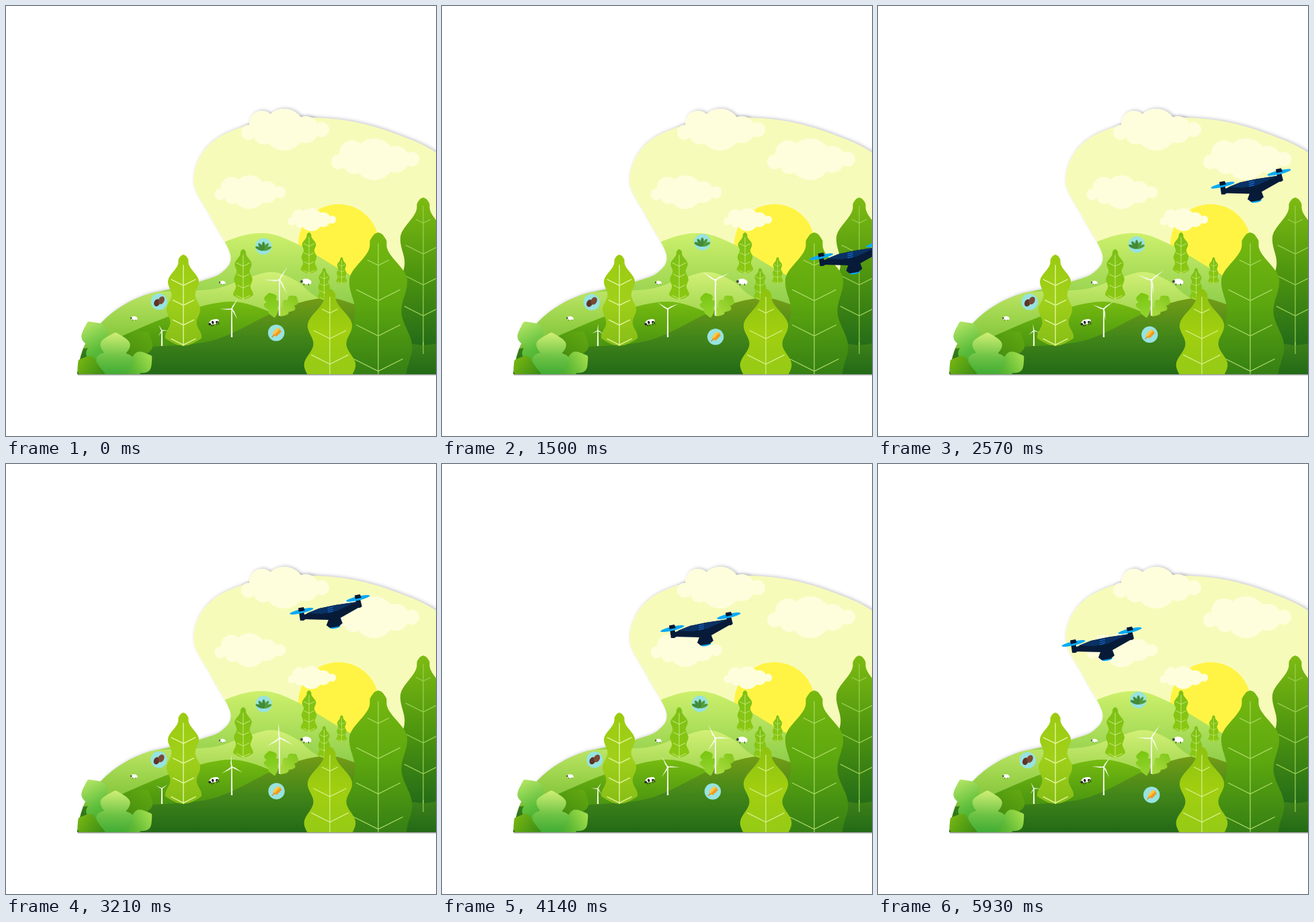
Animation of 640 by 640 pixels, one loop 6000 ms. Source, as an HTML page with a canvas:

```html
<!DOCTYPE html>
<html lang="en">
<head>
<meta charset="utf-8">
<title>Green valley</title>
<style>
html, body { margin: 0; width: 100%; height: 100%; overflow: hidden; background: #fff; }
canvas { display: block; width: 640px; height: 640px; }
</style>
</head>
<body>
<canvas id="stage" width="640" height="640"></canvas>
<script>
const LOOP = 6000, GROUND = 548, TAU = Math.PI * 2;
const stage = document.getElementById('stage').getContext('2d');
const backdrop = document.createElement('canvas');
backdrop.width = backdrop.height = 640;
let c = backdrop.getContext('2d');

const smooth = u => { u = Math.max(0, Math.min(1, u)); return u * u * (3 - 2 * u); };

// Smooth open path through a few points
function spline(pts) {
  const p = new Path2D();
  const at = i => pts[Math.max(0, Math.min(pts.length - 1, i))];
  p.moveTo(...pts[0]);
  for (let i = 0; i < pts.length - 1; i++) {
    const [a, b, d, e] = [at(i - 1), at(i), at(i + 1), at(i + 2)];
    p.bezierCurveTo(b[0] + (d[0] - a[0]) / 6, b[1] + (d[1] - a[1]) / 6,
      d[0] - (e[0] - b[0]) / 6, d[1] - (e[1] - b[1]) / 6, d[0], d[1]);
  }
  return p;
}

function shade(x0, y0, x1, y1, cols) {
  const g = c.createLinearGradient(x0, y0, x1, y1);
  cols.forEach((col, i) => g.addColorStop(i / (cols.length - 1), col));
  return g;
}

function at(x, y, turn, paint) {
  c.save();
  c.translate(x, y);
  c.rotate(turn);
  paint();
  c.restore();
}

function trace(pts) {
  c.beginPath();
  pts.forEach(p => c.lineTo(...p));
}

function poly(pts, style) {
  trace(pts);
  c.fillStyle = style;
  c.fill();
}

function line(pts, style, width) {
  trace(pts);
  c.strokeStyle = style;
  c.lineWidth = width;
  c.stroke();
}

function oval(x, y, rx, ry, style, turn = 0) {
  c.beginPath();
  c.ellipse(x, y, rx, ry, turn, 0, TAU);
  c.fillStyle = style;
  c.fill();
}

// Fills a shape mirrored around its axis, from points of one side
function mirrored(side, style) {
  poly(side.concat(side.map(([x, y]) => [-x, y]).reverse()), style);
}

function hill(pts, top, ...cols) {
  const p = spline(pts);
  p.lineTo(700, GROUND);
  p.lineTo(0, GROUND);
  c.fillStyle = shade(0, top, 0, GROUND, cols);
  c.fill(p);
}

function cloud(x, y, s) {
  const puff = (dx, dy, r) => oval(x + dx * s, y + dy * s, r * s, r * s, '#fefedc');
  puff(-1, 0, 31);
  puff(-34, -9, 19);
  puff(-32, 8, 14);
  puff(31, 0, 20);
  puff(-54, 4, 11);
  puff(55, 0, 11);
}

// Knob on top, first bulge of half width `w` at depth `b`, then waves of length `wave`
function tree(x, top, o) {
  const { tall, w, b, wave, swing, grow, knob, vein, gap, cols, ink, stroke = 1.2, round = false } = o;
  const half = h => {
    const neck = knob * Math.sqrt(Math.min(1, h / knob));
    const bulge = (w - knob) * smooth((h - knob * 1.5) / (b - knob * 1.5));
    const ripple = h > b ? grow * (h - b) + swing * (Math.cos((h - b) / wave * TAU) - 1) : 0;
    const foot = round ? Math.sqrt(Math.min(1, (tall - h) / (w / 2))) : 1;
    return (neck + bulge + ripple) * foot;
  };
  at(x, top, 0, () => {
    const side = [];
    for (let i = 0; i <= 120; i++) side.push([half(tall * i / 120), tall * i / 120]);
    mirrored(side, shade(0, 0, 0, tall, cols));
    line([[0, vein * 0.33], [0, tall]], ink, stroke);
    for (let h = vein; h < tall; h += gap) {
      const reach = half(h - gap * 0.25) * 0.8;
      line([[-reach, h - reach / 2], [0, h], [reach, h - reach / 2]], ink, stroke);
    }
  });
}

function poplar(x, top, s, cols, ink, stroke) {
  tree(x, top, { tall: 136 * s, w: 23 * s, b: 40 * s, wave: 41 * s, swing: 3.2 * s, grow: 0.05,
    knob: 7.5 * s, vein: 46 * s, gap: 29.5 * s, cols, ink, stroke, round: true });
}

// Leaf with three rounded, forward pointing lobes on each side
function lobedLeaf(x0, y0, x1, y1, w, ...cols) {
  const len = Math.hypot(x1 - x0, y1 - y0);
  at(x0, y0, Math.atan2(y1 - y0, x1 - x0) + Math.PI / 2, () => {
    const side = [];
    for (let u = 0; u <= 1.001; u += 0.01) {
      const lobe = Math.abs(Math.sin(u * 3 * Math.PI)) ** 0.8;
      const body = Math.max(0, Math.sin(Math.PI * Math.min(1, u) ** 1.2)) ** 0.6;
      side.push([w * body * (0.58 + 0.42 * lobe), -len * (u + 0.1 * lobe * u * (1 - u) * 2)]);
    }
    mirrored(side, shade(0, -len * 0.2, 0, -len, cols));
  });
}

function sheep(x, y, s) {
  oval(x, y, 6.5 * s, 4.2 * s, '#fff');
  oval(x + 4 * s, y + s, 4 * s, 3.5 * s, '#fff');
  oval(x - 6.5 * s, y, 2 * s, 1.9 * s, '#3d4a38');
  [-3, 4].forEach(d => line([[x + d * s, y + 3 * s], [x + d * s, y + 6 * s]], '#3d4a38', s));
}

function cow(x, y) {
  at(x, y, -0.3, () => {
    [-5, -2, 3, 6].forEach(d => line([[d, 1], [d, 6]], '#2a2f28', 1));
    oval(0, 0, 7.5, 3.6, '#fff');
    oval(-2, 0.5, 1.7, 2.4, '#1d211c');
    oval(4, 1.5, 2, 1.3, '#1d211c');
    oval(-7, 1.5, 1.8, 1.8, '#1d211c');
  });
}

function paintScenery() {
  const land = spline([[106, GROUND], [115, 510], [134, 480], [166, 451], [205, 431], [250, 420], [292, 409],
    [322, 396], [334, 370], [305, 315], [279, 258], [310, 200], [400, 169], [510, 171], [610, 202], [670, 238]]);
  land.lineTo(670, GROUND);
  land.closePath();
  c.fillStyle = '#f7fbba';

  c.save();
  c.shadowColor = 'rgba(70,75,100,.32)';
  c.shadowBlur = 5;
  c.shadowOffsetX = 2;
  c.shadowOffsetY = -1;
  c.fill(land);
  cloud(415, 184, 1);
  c.restore();
  line([[107, GROUND + 0.6], [640, GROUND + 0.6]], 'rgba(95,105,90,.6)', 2);

  c.save();
  c.clip(land);
  c.fillStyle = '#f7fbba';
  c.fill(land);
  oval(495, 355, 60, 60, '#fff444');
  hill([[80, 480], [270, 385], [328, 350], [383, 338], [435, 355], [515, 402], [700, 500]], 338,
    '#cdf06c', '#90cf4c', '#6dba3c');
  hill([[80, 432], [240, 425], [310, 421], [350, 408], [395, 396], [432, 409], [490, 445], [700, 500]], 396,
    '#d2f076', '#97d148', '#5dab24');
  hill([[80, 535], [180, 488], [260, 456], [336, 440], [400, 458], [450, 482]], 440,
    '#76bb10', '#519c10', '#357f14');
  hill([[80, 510], [220, 507], [310, 497], [390, 460], [435, 442], [485, 435], [540, 450], [700, 490]], 436,
    '#739c16', '#42861a', '#236a16');
  c.restore();

  cloud(415, 184, 1);
  cloud(549, 228, 1);
  cloud(363, 277, 0.81);
  cloud(455, 318, 0.55);

  const lime = ['#7cc016', '#8bc812'], pale = '#d4ef8c';
  poplar(451, 337, 0.45, lime, pale, 0.8);
  poplar(499.5, 374, 0.29, lime, pale, 0.6);
  poplar(473.5, 390, 0.35, lime, pale, 0.7);
  poplar(353, 362, 0.55, lime, pale, 0.9);

  lobedLeaf(400, 464, 392, 427, 12, '#8fd22c', '#79c60f');
  lobedLeaf(408, 462, 432, 432, 11, '#a4d93c', '#83c81a');

  sheep(446.5, 410, 1);
  sheep(322, 411.5, 0.6);
  sheep(190.5, 464.5, 0.65);
  cow(309.5, 470);

  poplar(264, 370, 1, ['#9bcb10', '#a0d01a', '#86be16'], '#e2f59a', 1.4);

  c.save();
  c.beginPath();
  c.rect(0, 0, 640, GROUND);
  c.clip();
  tree(621, 285, { tall: 220, w: 34, b: 60, wave: 80, swing: 4.5, grow: 0.07, knob: 9.5, vein: 38, gap: 46,
    cols: ['#7dbb12', '#4f960f', '#246c18'], ink: '#9bd052', round: true });
  line([[621, 500], [621, 518]], '#9bd052', 1.2);
  tree(554, 337, { tall: 215, w: 43, b: 71, wave: 97, swing: 6, grow: 0.075, knob: 12.5, vein: 49, gap: 52.5,
    cols: ['#76b90f', '#5ca60f', '#347e15'], ink: '#abdb64' });
  tree(482, 421, { tall: 130, w: 33, b: 54, wave: 58, swing: 5.5, grow: 0.09, knob: 8.5, vein: 36, gap: 38,
    cols: ['#8dc20f', '#a1cf10', '#95ca16'], ink: '#d8f08c' });

  lobedLeaf(158, 566, 211, 485, 24, '#276f13', '#4c940f', '#62a812');
  lobedLeaf(168, 560, 122, 470, 25, '#2f9a2a', '#5fbf3c', '#b4e565');
  lobedLeaf(166, 570, 108, 527, 21, '#2c7a17', '#4d9a14', '#76b512');
  lobedLeaf(145, 566, 217, 521, 21, '#2f9c2a', '#5db834', '#a3df4c');
  lobedLeaf(161, 578, 163, 486, 28, '#2ea22e', '#6cc244', '#d0f075');
  c.restore();
}

function turbine(x, y, size, foot, angle) {
  poly([[x - 0.8, y], [x + 0.8, y], [x + 1.2, foot], [x - 1.2, foot]], '#f3f8e8');
  for (let i = 0; i < 3; i++) {
    at(x, y, (angle + i * 120) * Math.PI / 180, () =>
      poly([[-0.6, 0], [-size * 0.08, -size * 0.25], [0, -size], [0.6, 0]], '#f5faea'));
  }
  oval(x, y, size * 0.08, size * 0.08, '#fff');
}

const icons = {
  leaf() {
    [-1.15, 1.15, -0.6, 0.6, 0].forEach((turn, i) => at(0, 6, turn, () => {
      oval(0, -6.5, 2.4, 6.5, i % 2 ? '#57a23c' : '#468f3a');
      line([[0, 0], [0, -11]], '#357a38', 0.5);
    }));
  },
  nut() {
    oval(-3.2, 1.6, 4.3, 5.6, '#5e3428', 0.45);
    oval(3.4, -2, 4.3, 6, '#7b4935', 0.45);
  },
  grain() {
    at(0, 0, 0.78, () => {
      oval(0, -1, 3, 7.5, '#f9b12c');
      for (let y = -5; y < 3; y += 3.5) {
        oval(-2.4, y, 1.8, 2.4, '#ffc844', -0.4);
        oval(2.4, y, 1.8, 2.4, '#ee9820', 0.4);
      }
      line([[0, 4], [0, 9.5]], '#d98b25', 1.4);
    });
  }
};

function badge(icon, x, y, dx, dy, p) {
  at(x + dx * p, y + dy * p, 0, () => {
    oval(0, 0, 12.2, 12.2, '#97e3e0');
    icons[icon]();
  });
}

function rotor(x, y) {
  poly([[x - 4, y], [x + 3, y], [x + 6, y + 12], [x + 3, y + 14], [x - 2, y + 14]], '#071b39');
  oval(x, y, 18, 3, '#0aaaf5', -0.23);
  poly([[x - 5, y - 4.5], [x + 3, y - 6], [x + 5, y - 1], [x - 4, y + 1]], '#061630');
}

function drone(x, y) {
  const dark = '#071b39';
  at(x, y, 0, () => {
    oval(50, 23.5, 8, 2.4, '#0aaaf5', -0.2);
    poly([[0, 7], [26, -4], [50, -9], [84, -14], [88, -7], [58, 10], [61, 18], [55, 23], [42, 25],
      [37, 21], [40, 13], [2, 12]], dark);
    poly([[8, 3], [26, -4], [50, -9], [82, -14], [52, 0], [30, 4]], '#0a3163');
    for (let d = 0; d < 9; d += 3) line([[39, d - 4], [47, d - 6]], '#1769cc', 1.2);
    rotor(0, 0);
    rotor(84, -19);
  });
}

// Value number k of keys [time, ...values] at time t, without overshoot
function follow(keys, t, k) {
  let i = 0;
  while (i < keys.length - 2 && t >= keys[i + 1][0]) i++;
  const slope = n => {
    const a = keys[n], b = keys[n + 1];
    return a && b ? (b[k] - a[k]) / (b[0] - a[0]) : slope(n < 0 ? 0 : n - 1);
  };
  const tangent = n => {
    const a = slope(n - 1), b = slope(n);
    return a * b <= 0 ? 0 : 2 * a * b / (a + b);
  };
  const [a, b] = [keys[i], keys[i + 1]], h = b[0] - a[0];
  const u = Math.min(1, (t - a[0]) / h), w = 1 - u;
  return w * w * (1 + 2 * u) * a[k] + u * u * (3 - 2 * u) * b[k] + h * u * w * (w * tangent(i) - u * tangent(i + 1));
}

const flight = [[0, 710, 485], [1000, 592, 414], [2000, 542, 328], [2600, 511, 264],
  [3210, 440, 219], [4140, 343, 245], [4750, 291, 267]];

// Swings up and down every 2300 ms, after a shorter first swing
function sway(t) {
  if (t < 1300) return smooth(t / 1300);
  const n = (t - 1300) / 2300, u = smooth(n % 1);
  return Math.floor(n) % 2 ? u : 1 - u;
}

function draw(t) {
  c.fillStyle = '#fff';
  c.fillRect(0, 0, 640, 640);
  c.drawImage(backdrop, 0, 0);
  const angle = 31 + t * 0.1015, p = sway(t);
  turbine(407, 408, 23, 461, angle);
  turbine(336, 451, 18, 493, angle);
  turbine(232, 483, 10, 506, angle + 60);
  badge('leaf', 383.2, 357.8, 4.3, -6.5, p);
  badge('nut', 227.9, 440, -5.2, 0.9, p);
  badge('grain', 402.2, 486.5, 5, 6, p);
  drone(follow(flight, t, 1), follow(flight, t, 2));
}

paintScenery();
c = stage;
const start = performance.now();
function tick() {
  draw((performance.now() - start) % LOOP);
  requestAnimationFrame(tick);
}
tick();
</script>
</body>
</html>
```
